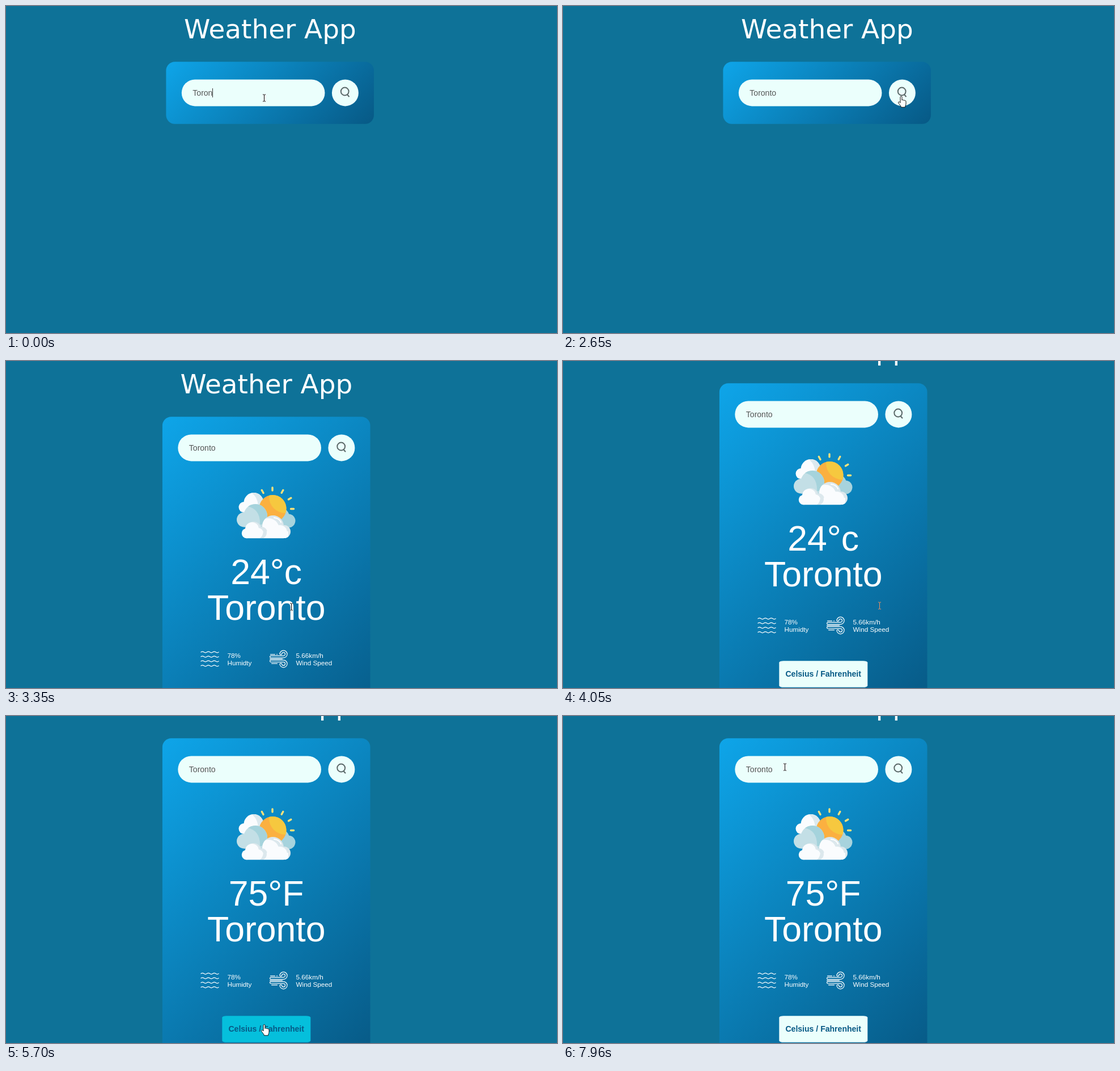
Animation of 972 by 576 pixels, one loop 8000 ms. Source, as an HTML page:

```html
<!DOCTYPE html>
<html lang="en">
<head>
<meta charset="utf-8">
<title>Weather App</title>
<style>
  html, body { margin: 0; height: 100%; overflow: hidden; background: #0e7298; }
  svg { display: block; width: 100vw; height: 100vh; font-family: "Liberation Sans", Arial, sans-serif; }
  .mid { text-anchor: middle; }
  .big { font-size: 62.5px; }
  .small { font-size: 11.72px; }
  .line { fill: none; stroke: #fff; stroke-width: 1.2; stroke-linecap: round; }
  #beam { mix-blend-mode: difference; }
</style>
</head>
<body>
<svg viewBox="0 0 972 576">
  <defs>
    <linearGradient id="sky" gradientUnits="userSpaceOnUse">
      <stop stop-color="#0ea5e9"/><stop offset="1" stop-color="#075985"/>
    </linearGradient>
    <clipPath id="sunClip"><circle cx="470.5" cy="260" r="24"/></clipPath>
    <clipPath id="backClip"><circle cx="437" cy="249.500" r="17.500"/></clipPath>
    <clipPath id="midClip"><circle cx="440" cy="273" r="21"/></clipPath>
    <clipPath id="bigClip"><circle cx="471" cy="291" r="19"/><circle cx="490.500" cy="300.500" r="11.500"/></clipPath>
  </defs>
  <rect width="972" height="576" fill="#0e7298"/>

  <g id="page" fill="#fff">
    <text class="mid" x="465.8" y="57" font-size="46.875" style="font-family:'DejaVu Sans',Verdana,sans-serif">Weather App</text>
    <rect id="card" x="282.4" y="98.2" width="366.6" rx="15.6" fill="url(#sky)"/>

    <g fill="#ebfffc">
      <rect x="309.8" y="129.4" width="252.700" height="47" rx="23.5"/>
      <circle cx="598.4" cy="152.900" r="23.5"/>
    </g>
    <text id="query" x="329.3" y="157.7" font-size="14.06" fill="#555"></text>
    <rect id="caret" y="145" width="1" height="16" fill="#333"/>
    <g fill="none" stroke="#5b6868" stroke-width="2">
      <circle cx="597.7" cy="150.5" r="6.9"/>
      <path d="M601.500 155.500L605.500 160"/>
    </g>

    <g id="icon" transform="translate(6.5)">
      <path d="M451.300 227.500l2.700 5M470 223v5M488.800 227.500l-2.600 4.800M498.500 243.800l4.300-2.500M502.500 260.500h5" stroke="#fae27c" stroke-width="3.400" stroke-linecap="round"/>
      <g fill="#fafcfe">
        <circle cx="437" cy="249.500" r="17.500"/>
        <circle cx="420" cy="257.500" r="9.500"/>
        <rect x="420" y="252" width="28" height="15"/>
        <g clip-path="url(#backClip)" fill="#dce9ee"><path d="M431 231q16 8 14 36h14v-36z"/></g>
      </g>
      <g fill="#a7d3dd">
        <circle cx="498.500" cy="281.500" r="12"/>
        <circle cx="483" cy="275" r="17"/>
      </g>
      <circle cx="470.500" cy="260" r="24" fill="#fbb040"/>
      <circle cx="493" cy="239" r="29" fill="#f6c83f" clip-path="url(#sunClip)"/>
      <g fill="#c3dfe6">
        <circle cx="440" cy="273" r="21"/>
        <circle cx="420" cy="279.500" r="13"/>
        <rect x="420" y="276" width="50" height="16.500"/>
        <path d="M425 256q24 4 23 32h22v-40h-45z" fill="#a5d3dc" clip-path="url(#midClip)"/>
      </g>
      <g fill="#fafcfe">
        <g fill="#dce8ed"><circle cx="471" cy="291" r="19"/><circle cx="490.500" cy="300.500" r="11.500"/></g>
        <g clip-path="url(#bigClip)"><circle cx="463" cy="296" r="19"/><circle cx="483" cy="302" r="13"/><path d="M450 300h48v12h-48z"/></g>
        <path d="M473 276q9 1 12 8" fill="none" stroke="#fff" stroke-width="2" stroke-linecap="round"/>
        <g fill="#dce8ed"><circle cx="437" cy="296" r="13"/><circle cx="451" cy="302" r="10"/></g>
        <circle cx="434" cy="296" r="12"/>
        <circle cx="424.500" cy="303.500" r="8.700"/>
        <circle cx="445" cy="303" r="9"/>
        <path d="M424 300h66v12.200h-66z"/>
        <path d="M449 294q7 3 4 11-1 4-5 7h6q6-3 6-10 0-8-8-9z" fill="#dce8ed"/>
      </g>
    </g>

    <g id="report">
      <text id="degrees" class="mid big" x="465.7" y="260"></text>
      <text class="mid big" x="465.7" y="323.5">Toronto</text>
      <g class="small">
        <text x="397" y="390">78%</text>
        <text x="397" y="403.500">Humidty</text>
        <text x="518" y="390">5.66km/h</text>
        <text x="518" y="403.500">Wind Speed</text>
      </g>
      <g id="waves" class="line"></g>
      <g class="line">
        <path d="M496 386.500a3 3 0 1 0-3-3q-1.500 2-3.500 0a6.500 6.500 0 1 1 6.500 6.500H473q-2-1.700 0-3.400z"/>
        <path d="M496 397.500a3 3 0 1 1-3 3q-1.500-2-3.500 0a6.500 6.500 0 1 0 6.500-6.500H473q-2 1.700 0 3.400z"/>
        <path d="M472 392H494M473 384H481M484 384h1M475 400h10"/>
      </g>
      <rect id="button" x="387.800" y="454.400" width="156" height="46.600" rx="8" ry="3"/>
      <text class="mid" x="465.700" y="482.400" font-size="14.06" font-weight="bold" fill="#075985">Celsius / Fahrenheit</text>
    </g>
  </g>

  <path id="beam" d="M-2.500-6H-.7L0-5.300L.7-6H2.500M0-5.500V5.500M-2.500 6H-.7L0 5.300L.7 6H2.500" fill="none" stroke="#fff"/>
  <path id="hand" d="M-1.500 1.500a1.500 1.500 0 0 1 3 0V7a1.400 1.400 0 0 1 2.600.3 1.400 1.400 0 0 1 2.400.6 1.300 1.300 0 0 1 2 1.100v4c0 3-1.500 3.500-1.500 6.300H0C-.5 16-4.500 13.500-5 11c0-1.700 2-1.700 3.500.5z" fill="#fff" stroke="#111"/>
  <path id="arrow" d="M0 0V16L3.700 12.500L6.200 18.200L8.600 17.200L6.100 11.700H11.300z" fill="#fff" stroke="#111"/>
</svg>

<script>
const LOOP = 8000, CARD_X = 282.4, CARD_Y = 98.2, CARD_W = 366.6;
const el = id => document.getElementById(id);
const set = (id, attrs) => { for (const k in attrs) el(id).setAttribute(k, attrs[k]); };
const show = (id, on) => set(id, { visibility: on ? 'visible' : 'hidden' });
const within = (t, ...spans) => spans.some(([a, b]) => t >= a && t < b);

// start time, x, y, pointer shape; each pose holds until the next
const pointer = [
  [0, 455.5, 162, 'beam'], [1950, 478, 152, 'beam'], [2080, 530, 137, 'beam'],
  [2210, 570, 124, 'arrow'], [2340, 596.5, 159, 'hand'],
  [3080, 575, 245, 'arrow'], [3210, 535, 360, 'beam'], [3350, 503.5, 433, 'beam'],
  [3480, 535, 434, 'beam'], [3620, 558.5, 431, 'beam'],
  [4300, 540, 462, 'beam'], [4440, 502, 508, 'arrow'], [4570, 470, 537, 'hand'],
  [4700, 457, 542.5, 'hand'], [4840, 455.5, 543.5, 'hand'],
  [6120, 455, 532, 'hand'], [6260, 452, 480, 'arrow'], [6400, 445, 400, 'beam'],
  [6530, 434, 310, 'beam'], [6670, 422, 220, 'arrow'], [6810, 408, 140, 'arrow'],
  [6940, 393, 95, 'beam'], [7080, 382, 76, 'beam'], [7220, 387.5, 85, 'beam'],
  [7360, 391.5, 90, 'beam']
];

for (let row = 0; row < 4; row++)
  el('waves').innerHTML += `<path d="M350.500 ${380 + row * 8}q2.600-2 5.200 0t5.200 0 5.200 0 5.200 0 5.200 0 5.200 0"/>`;

function draw(t) {
  const found = t >= 2810, loaded = t >= 2940;
  const scroll = t < 3760 ? 0 : t < 3890 ? 24 : 59;
  const height = loaded ? 566.8 : found ? 434 : 109.5;
  const midX = CARD_X + CARD_W / 2, midY = CARD_Y + height / 2, reach = (CARD_W + height) / 4;

  set('page', { transform: `translate(${loaded ? -6.5 : 0} ${-scroll})` });
  set('card', { height });
  set('sky', { x1: midX - reach, y1: midY - reach, x2: midX + reach, y2: midY + reach });
  set('report', { transform: `translate(0 ${loaded ? 132.8 : 0})` });
  show('report', found);
  show('icon', loaded);

  const typed = t < 1100 ? 'Toron' : 'Toronto';
  el('query').textContent = typed;
  set('caret', { x: typed === 'Toron' ? 364 : 376.5 });
  show('caret', within(t, [0, 520], [1100, 1680], [2210, 2650], [7360, 7960]));
  el('degrees').textContent = t < 5700 ? '24°c' : '75°F';
  set('button', { fill: within(t, [4570, 6260]) ? '#05bfdc' : '#ebfffc' });

  const [, x, y, shape] = pointer.findLast(p => p[0] <= t);
  for (const id of ['beam', 'hand', 'arrow']) show(id, id === shape);
  set(shape, { transform: `translate(${x} ${y})` });
}

function tick() {
  draw(performance.now() % LOOP);
  requestAnimationFrame(tick);
}
tick();
</script>
</body>
</html>
```
